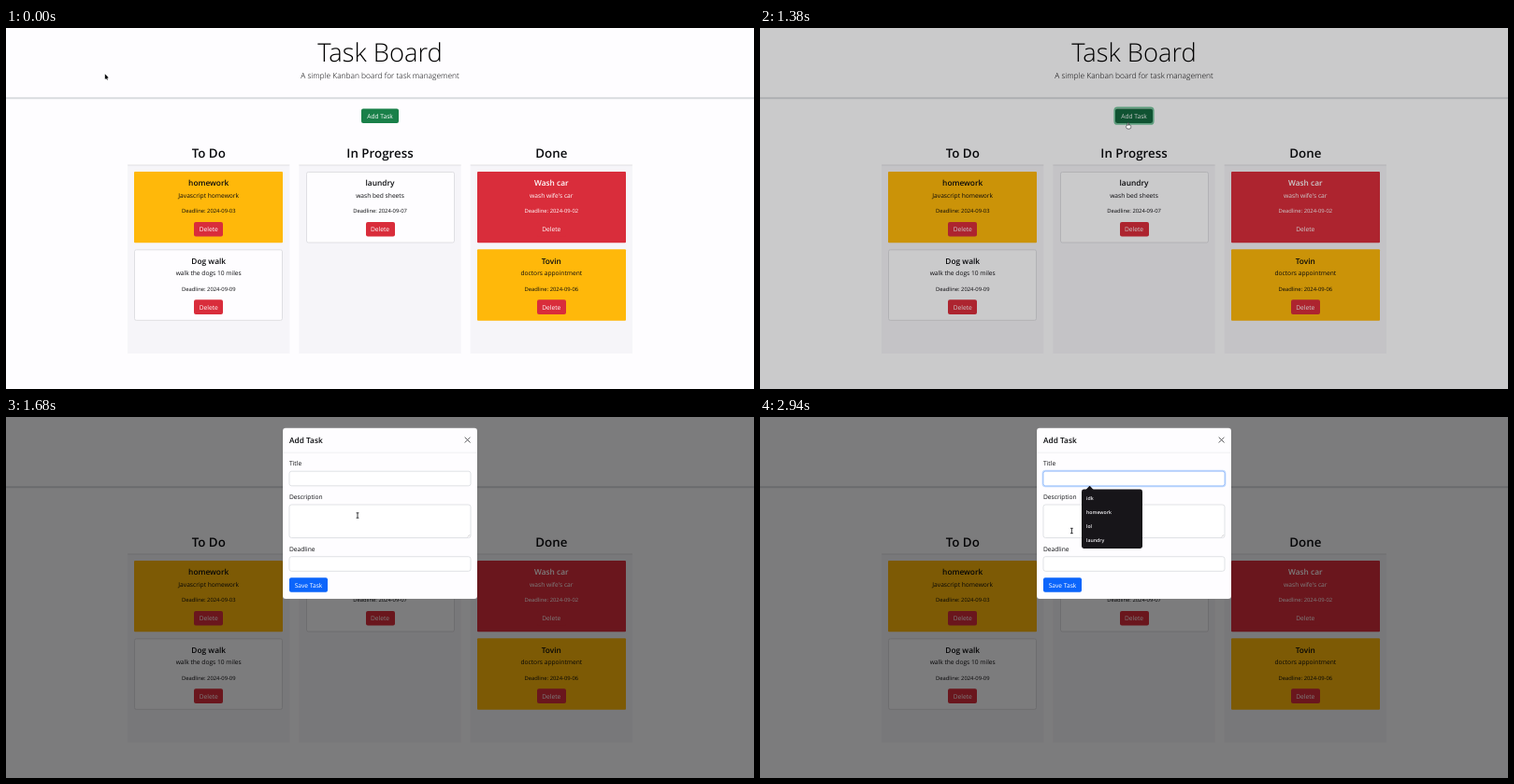
An HTML page with a canvas for the animation above (3000 ms loop, 800 by 387 pixels).

```html
<!DOCTYPE html>
<html lang="en">
<head>
<meta charset="utf-8">
<title>Task Board</title>
<style>
  html, body { margin: 0; width: 100%; height: 100%; overflow: hidden; background: #fefdff; }
  canvas { display: block; width: 800px; height: 387px; }
</style>
</head>
<body>
<canvas id="stage"></canvas>
<script>
const W = 800, H = 387, LOOP = 3000, STEP = 60;
const canvas = document.getElementById('stage');
const ctx = canvas.getContext('2d');
const dpr = window.devicePixelRatio || 1;
canvas.width = W * dpr;
canvas.height = H * dpr;
ctx.textRendering = 'geometricPrecision';

const FONT = '"Open Sans", "Noto Sans", sans-serif';
const PAGE = '#fefdff', INK = '#0a0b0e', RED = '#d92d3b', YELLOW = '#ffb80a';
const BODY = 6.667, HEAD = 8.333, SMALL = 5.833, HINT = 5.2;
const BTN_H = 15.6, PITCH = 183.3, COL_W = 173.2, ROW_H = 15;
const CLICK = 1340, MODAL = 1440, FOCUS = 1980;

const COLUMNS = [
  { name: 'To Do', cards: [
    { title: 'homework', text: 'Javascript homework', day: '03', fill: YELLOW },
    { title: 'Dog walk', text: 'walk the dogs 10 miles', day: '09', fill: PAGE }] },
  { name: 'In Progress', cards: [
    { title: 'laundry', text: 'wash bed sheets', day: '07', fill: PAGE }] },
  { name: 'Done', cards: [
    { title: 'Wash car', text: "wash wife's car", day: '02', fill: RED },
    { title: 'Tovin', text: 'doctors appointment', day: '06', fill: YELLOW }] }
];
const HINTS = ['idk', 'homework', 'lol', 'laundry'];

// Where the pointer rests; it eases from one stop to the next
const STOPS = [
  { t: 0, x: 105.8, y: 49.3 },
  { t: 700, x: 413.5, y: 87 },
  { t: 1320, x: 395.3, y: 101.3 },
  { t: 1680, x: 376, y: 105.5 },
  { t: 1920, x: 352.5, y: 67 },
  { t: 2280, x: 352.5, y: 85.5 },
  { t: 2760, x: 333.4, y: 122 }
];

const clamp = v => Math.max(0, Math.min(1, v));
const smooth = v => v * v * (3 - 2 * v);
const easeOut = v => 1 - (1 - v) ** 3;
const middle = (y, size) => y + 0.388 * size;

function pointerAt(t) {
  const next = STOPS.find(s => s.t > t);
  if (!next) return STOPS[STOPS.length - 1];
  const prev = STOPS[STOPS.indexOf(next) - 1];
  const k = smooth((t - prev.t) / (next.t - prev.t));
  return { x: prev.x + (next.x - prev.x) * k, y: prev.y + (next.y - prev.y) * k };
}

// Text centred vertically on y
function text(str, x, y, size, weight = 400, color = INK, align = 'center') {
  ctx.font = `${weight} ${size}px ${FONT}`;
  ctx.fillStyle = color;
  ctx.textAlign = align;
  ctx.fillText(str, x, middle(y, size));
}

function box(x, y, w, h, r, fill, stroke, line = 0.6) {
  ctx.beginPath();
  ctx.roundRect(x, y, w, h, r);
  if (fill) { ctx.fillStyle = fill; ctx.fill(); }
  if (stroke) { ctx.strokeStyle = stroke; ctx.lineWidth = line; ctx.stroke(); }
}

function line(x0, y0, x1, y1, color, width) {
  ctx.beginPath();
  ctx.moveTo(x0, y0);
  ctx.lineTo(x1, y1);
  ctx.strokeStyle = color;
  ctx.lineWidth = width;
  ctx.stroke();
}

function cross(x, y, r, color, width) {
  line(x - r, y - r, x + r, y + r, color, width);
  line(x - r, y + r, x + r, y - r, color, width);
}

function button(label, x, y, w, fill) {
  box(Math.round(x - w / 2), y, w, BTN_H, 2, fill);
  text(label, x, y + BTN_H / 2, BODY, 400, '#fff');
}

function drawCard(card, x, y) {
  const ink = card.fill === RED ? '#fff' : INK;
  const left = Math.round(x - 79.5);
  if (card.fill === PAGE) box(left + 0.5, y + 0.5, 158, 75.5, 1.8, PAGE, '#d9d8dc', 0.8);
  else box(left, y, 159, 76.3, 1, card.fill);
  text(card.title, x, y + 12, HEAD, 600, ink);
  text(card.text, x, y + 25.3, BODY, 400, ink);
  text('Deadline: 2024-09-' + card.day, x, y + 42.2, SMALL, 400, ink);
  button('Delete', x, y + 54, 31, RED);
}

function drawBoard(clicked, hover) {
  ctx.fillStyle = PAGE;
  ctx.fillRect(0, 0, W, H);
  text('Task Board', 400, 25.5, 27.3, 300, '#000');
  text('A simple Kanban board for task management', 400, 51, 8.4, 300, '#000');
  ctx.fillStyle = '#d9dcdf';
  ctx.fillRect(0, 74.2, W, 2);

  if (clicked) box(379.3, 85.3, 41.4, 17.6, 3, null, '#75c69d', 1.8);
  button('Add Task', 400, 86.4, 40, hover ? '#14683f' : '#198049');

  COLUMNS.forEach((col, i) => {
    const x = 400 + (i - 1) * PITCH, left = x - COL_W / 2;
    ctx.fillStyle = '#f6f5f9';
    ctx.fillRect(left, 147, COL_W, 202);
    line(left, 147, left + COL_W, 147, '#d9d8dc', 0.8);
    text(col.name, x, 133.7, 13.33, 600);
    col.cards.forEach((card, n) => drawCard(card, x, 154 + n * 83.33));
  });
}

function drawModal(focused, row) {
  box(296, 11.8, 208, 183.1, 3, PAGE, 'rgba(0,0,0,.2)', 0.4);
  text('Add Task', 303, 24.6, HEAD, 600, INK, 'left');
  cross(493.6, 24.6, 2.9, '#4c4c50', 0.9);
  line(296.2, 38.2, 503.8, 38.2, '#dee0e4', 0.5);

  let y = 44.8;
  for (const name of ['Title', 'Description', 'Deadline']) {
    const top = y + 13.4, h = name === 'Description' ? 35.5 : BTN_H;
    const active = focused && name === 'Title';
    const filled = active && row >= 0;
    text(name, 303, y + 5, BODY, 400, INK, 'left');
    if (active) box(302.4, top - 0.7, 195.2, h + 1.4, 3, null, '#c0d9fd', 1.6);
    box(303, top, 194, h, 2.4, filled ? '#e6effd' : '#fff', active ? '#86b2fa' : '#d3d6da', 0.7);
    if (filled) text(HINTS[row], 308, top + h / 2, HINT, 600, INK, 'left');
    if (name === 'Description') line(493.8, top + h - 1, 496, top + h - 3.2, '#77777c', 0.4);
    y = top + h + 6.8;
  }
  button('Save Task', 323.5, y + 0.1, 41, '#0b65fb');
}

function drawHints(row) {
  const fill = '#171519';
  ctx.save();
  ctx.translate(352.6, 78);
  ctx.rotate(Math.PI / 4);
  box(-3, -3, 6, 6, 0.5, fill);
  ctx.restore();
  box(344, 77.6, 65, 63.4, 2.4, fill);
  HINTS.forEach((str, i) => {
    const y = 86.9 + i * ROW_H;
    if (i === row) {
      box(344.4, y - ROW_H / 2, 64.2, ROW_H, 0, '#343337');
      cross(400, y, 1.6, '#e9e9ec', 0.7);
    }
    text(str, 349, y, HINT, 600, '#f4f3f6', 'left');
  });
}

const pointers = {
  arrow() {
    ctx.beginPath();
    ctx.moveTo(0, 0);
    ctx.lineTo(0, 5.4);
    ctx.lineTo(3.9, 4);
    ctx.closePath();
    ctx.strokeStyle = '#fff';
    ctx.lineWidth = 0.9;
    ctx.stroke();
    ctx.fillStyle = INK;
    ctx.fill();
    line(1.2, 3, 2.6, 6.2, INK, 1);
  },
  hand() {
    box(-2, 2.4, 4.8, 4, 1.5, '#fff', INK, 0.6);
    box(-0.7, 0, 1.3, 4, 0.6, '#fff', INK, 0.6);
    box(-1.6, 3, 4, 2.6, 1, '#fff');
  },
  beam() {
    for (const [color, width] of [['rgba(255,255,255,.8)', 1.6], [INK, 0.8]]) {
      line(0, -2.6, 0, 2.6, color, width);
      for (const y of [-2.7, 2.7]) line(-1.4, y, 1.4, y, color, width);
    }
  }
};

function draw(t) {
  const p = pointerAt(t);
  const inside = (x, y, w, h) => p.x > x && p.x < x + w && p.y > y && p.y < y + h;
  const clicked = t >= CLICK, focused = t >= FOCUS;
  const overAdd = t < MODAL && inside(380, 86, 40, 16);
  const overHints = focused && inside(344, 79.4, 65, HINTS.length * ROW_H);
  const row = overHints ? Math.floor((p.y - 79.4) / ROW_H) : -1;

  ctx.setTransform(dpr, 0, 0, dpr, 0, 0);
  drawBoard(clicked, overAdd || clicked);

  ctx.fillStyle = `rgba(0,0,0,${0.51 * clamp((t - CLICK) / (MODAL - CLICK))})`;
  ctx.fillRect(0, 0, W, H);

  if (t > MODAL) {
    ctx.save();
    ctx.globalAlpha = clamp((t - MODAL) / 150);
    ctx.translate(0, -20.8 * (1 - easeOut(clamp((t - MODAL) / 240))));
    drawModal(focused, row);
    ctx.restore();
  }
  if (focused) drawHints(row);

  const kind = overAdd ? 'hand' : t < MODAL || overHints ? 'arrow' : 'beam';
  ctx.save();
  ctx.translate(p.x, p.y);
  pointers[kind]();
  ctx.restore();
}

const start = performance.now();
function tick() {
  const t = (performance.now() - start) % LOOP;
  draw(Math.floor(t / STEP) * STEP);
  requestAnimationFrame(tick);
}
tick();
</script>
</body>
</html>
```
